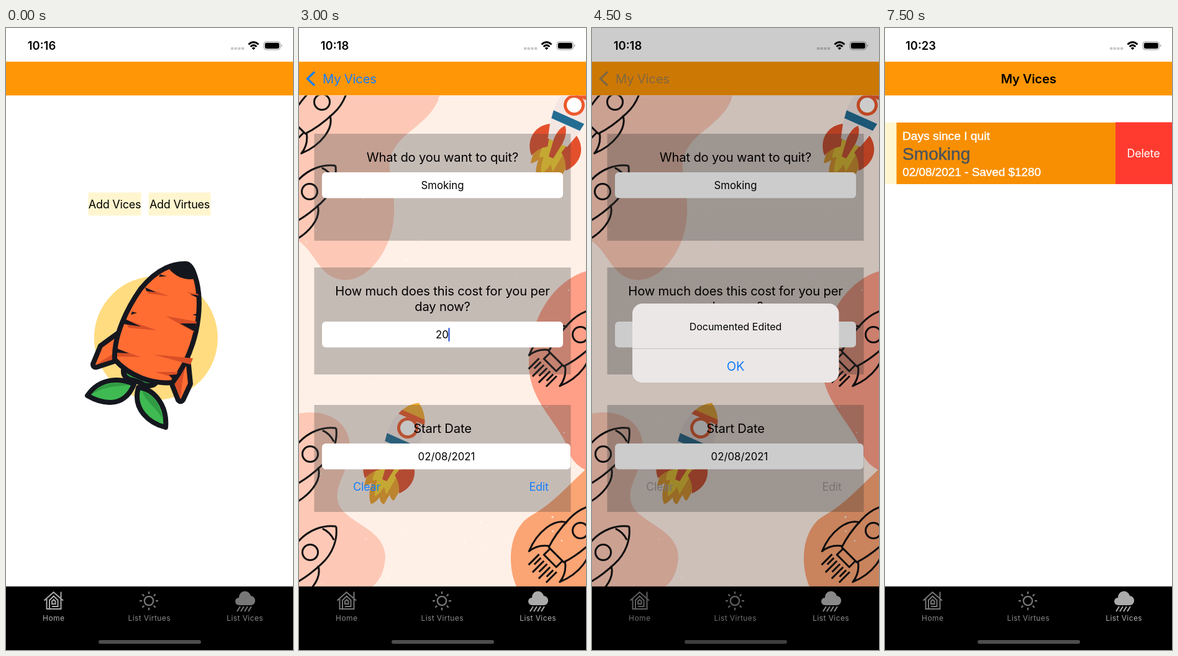
Recreate the animation shown at these times as an HTML page. Size 462 by 1000 pixels, loop 8 s.

```html
<!DOCTYPE html>
<html lang="en">
<head>
<meta charset="utf-8">
<style>
  html, body { margin: 0; height: 100%; overflow: hidden; background: #fff; }
  svg { display: block; width: 100vw; height: 100vh; font-family: Inter, sans-serif; }
  .cell { font-family: "Liberation Sans", Arial, sans-serif; }
</style>
</head>
<body>
<svg id="stage" viewBox="0 0 462 1000"></svg>
<script>
const ORANGE = '#ff9605', CREAM = '#fff6cf', BLUE = '#147efb', INK = '#15171f';

const rect = (x, y, w, h, fill, r = 0) =>
  `<rect x="${x}" y="${y}" width="${w}" height="${h}" rx="${r}" fill="${fill}"/>`;
const path = (d, fill, extra = '') => `<path d="${d}" fill="${fill}" ${extra}/>`;
const line = (d, color, width = 2, extra = '') =>
  path(d, 'none', `stroke="${color}" stroke-width="${width}" ${extra}`);
const circle = (x, y, r, fill, extra = '') =>
  `<circle cx="${x}" cy="${y}" r="${r}" fill="${fill}" ${extra}/>`;
const group = (transform, body, extra = '') => `<g transform="${transform}" ${extra}>${body}</g>`;
const text = (x, y, size, str, fill = '#000', extra = '') =>
  `<text x="${x}" y="${y}" font-size="${size}" fill="${fill}" ${extra}>${str}</text>`;

// Text sizes of the interface: large, medium, small
const MID = 'text-anchor="middle"';
const large = (x, y, s, fill, extra = MID) => text(x, y, 20.2, s, fill, extra + ' letter-spacing="-.17"');
const medium = (x, y, s, fill) => text(x, y, 18, s, fill, MID + ' letter-spacing="-.25"');
const small = (x, y, s) => text(x, y, 16.8, s, '#000', MID);

function statusBar(time) {
  const dots = [362, 367.6, 373.3, 379].map(x => rect(x, 31, 4.3, 4, '#c9c9c9', 1)).join('');
  const wifi = line('M390.5 26.5Q398.5 19 406.5 26.5M393.6 30Q398.5 25.3 403.4 30', '#000', 2.9) +
    path('M395.6 32.2Q398.5 29.6 401.4 32.2L398.5 35.2Z', '#000');
  const battery = `<rect x="415" y="22" width="26.5" height="13" rx="4" fill="none" stroke="#999"/>` +
    rect(416.8, 23.8, 23, 9.4, '#000', 2.4) + path('M443 26.3Q446 28.5 443 30.7Z', '#999');
  return text(57.5, 35, 18.4, time, '#000', MID + ' font-weight="600"') + dots + wifi + battery;
}

function tabBar(active) {
  const icon = [
    c => line('M61.5 920.5L76.5 907L92 920.5M88.5 916V906.5M65.5 918V934H88.5V918M70 934V920L76.7 913.5L83.5 920V930H74', c) +
      line('M74 926V921.5L76.7 919L79.5 921.5V926Z', c),
    c => circle(230, 921, 7.2, 'none', `stroke="${c}" stroke-width="2.3"`) +
      [0, 1, 2, 3, 4, 5, 6, 7].map(i => group(`rotate(${i * 45} 230 921)`, line('M230 906V910', c, 2.3))).join(''),
    c => path('M376 928C367 928 367 916 375 916C375 903 391 902 394 913C404 914 403 928 394 928Z', c) +
      line('M377 930l-5 8M383 930l-5 8M389 930l-5 8M395 930l-5 8', c, 2)
  ];
  const tabs = [[76.7, 'Home'], [230.7, 'List Virtues'], [384.7, 'List Vices']].map(([x, label], i) => {
    const on = i === active;
    return icon[i](on ? '#ababab' : '#777') +
      text(x, 953, 12, label, on ? '#b0b0b0' : '#8a8a8a', MID + ' letter-spacing=".4"');
  });
  return rect(0, 897.8, 462, 102.2, '#000') + tabs.join('') + rect(149, 984, 165, 6, '#4d4d4d', 3);
}

const header = (title = '') =>
  rect(0, 54.2, 462, 54.2, ORANGE) + large(231, 89, title, '#000', MID + ' font-weight="600"');

function carrot() {
  const outline = `stroke="${INK}" stroke-width="8" stroke-linejoin="round"`;
  const shade = '#d94f27';
  return circle(241.3, 498.5, 99.5, '#ffdc80') +
    path('M189 549Q188 561 199 565Q213 568 222 574Q238 578 243 568Z', '#319c43', outline) +
    path('M206 573C187 563 152 560 131 591C152 603 189 614 206 573Z', '#3fba52', outline) +
    path('M138 589C160 575 182 576 197 574C185 569 156 567 138 589Z', '#319c43') +
    path('M213 578C238 580 260 606 257 642C232 636 203 614 213 578Z', '#3fba52', outline) +
    path('M219 584C227 604 245 612 252 630C250 608 237 587 219 584Z', '#319c43') +
    path('M185 487L152 511L140 540Q140 547 147 545L180 534Z', '#ff6d32', outline) +
    path('M178 497L171 525L146 540L176 532Z', shade) +
    path('M293 532L297 572L285 598Q281 603 277 598L266 570Z', '#ff6d32', outline) +
    path('M289 541L284 568L281 595L271 571Z', shade) +
    path('M290 379C299 380 303 394 307 408C318 456 305 522 268 570C235 573 198 559 175 533C173 495 195 450 217 419C240 391 265 378 290 379Z', '#ff6d32', outline) +
    path('M224 418L263 431L229 427ZM191 468L243 486L197 482ZM257 463L307 472L303 489ZM180 516L217 529L179 528ZM237 525L301 531L297 541ZM240 553L277 553L271 562ZM290 424L310 428L310 434Z', shade) +
    path('M224 417L242 425L226 423ZM190 467L217 480L190 476ZM280 475L306 475L304 488ZM178 515L198 523L177 522ZM262 558L275 557L270 566ZM296 428L311 430L311 435ZM248 396L259 399L246 400ZM203 456L211 458L201 461ZM300 461L309 459L308 463Z', INK) +
    path('M263 388C276 402 290 406 306 403L299 382Q294 374 283 377Z', INK);
}

function home() {
  return rect(132.5, 264.5, 85, 37, CREAM) + rect(229.5, 264.5, 100, 37, CREAM) +
    medium(175, 290, 'Add Vices') + medium(279.5, 290, 'Add Virtues') + carrot();
}

function list(days, detail, shift = 0) {
  const bold = 'stroke-width=".45" stroke=';
  const row = rect(0, 152, 110, 99, CREAM) + rect(109.5, 152, 352.5, 99, '#f88f02') +
    text(54.5, 216, 37.2, days, ORANGE, MID + ' font-weight="700"') +
    text(119, 180, 19.2, 'Days since I quit', '#fff', bold + '"#fff"') +
    text(119, 212, 28.1, 'Smoking', '#4b545c', bold + '"#4b545c"') +
    text(119.3, 238, 18.9, detail, '#fff', bold + '"#fff"');
  return group(`translate(${-shift})`, row, 'class="cell"') +
    (shift ? rect(371, 151.5, 91, 99.5, '#ff3b30') + medium(416, 208, 'Delete', '#fff') : '');
}

const mirrored = body => body + group('scale(-1 1)', body);

// Outlined rocket, its window at the origin
function lineRocket(x, y) {
  const half = 'M0 -59C17 -46 27 -24 26 0Q25 32 17 55H0M24 6C44 16 48 50 35 82Q33 64 18 53' +
    'M14 56V69H0M7 76V102M14 76V91M20 74V98';
  return group(`translate(${x} ${y}) rotate(45)`,
    mirrored(line(half, '#111', 3, 'stroke-linejoin="round"')) +
    line('M-13 -41Q0 -46 13 -41M0 76V94', '#111', 3) +
    circle(0, 0, 12.5, 'none', 'stroke="#111" stroke-width="3"'));
}

// Coloured rocket, its window at the origin
function colorRocket(x, y) {
  return group(`translate(${x} ${y}) rotate(24)`,
    path('M-23 62Q-32 92 -26 114Q-20 110 -17 104Q-15 126 -4 136Q2 130 4 120Q8 128 15 128Q16 118 17 110Q22 116 27 116Q32 90 23 62Z', '#f2a126') +
    path('M-18 66Q-21 90 -17 100L-11 96Q-9 116 -3 122Q2 114 4 102L12 112Q15 90 17 66Z', '#ffd52e') +
    mirrored(path('M21 42C45 54 49 82 30 102Q25 86 12 78Z', '#e4502c')) +
    path('M0 -44C24 -30 32 4 25 38L17 66H-17L-25 38C-32 4 -24 -30 0 -44Z', '#f4e6e2') +
    path('M0 -44Q14 -36 20 -22H-20Q-14 -36 0 -44Z', '#f3ac2f') +
    path('M-20 -23H20L23 -15H-23Z', '#ec5a2d') +
    path('M-27 21H27L25 34H-25Z', '#236d93') +
    path('M0 36Q8 44 8 62L4 92H-4L-8 62Q-8 44 0 36Z', '#e4502c') +
    circle(0, 0, 14.5, '#fff', 'stroke="#ec5a2d" stroke-width="5"'));
}

function wallpaper() {
  let seed = 7, specks = '';
  const random = () => (seed = seed * 16807 % 2147483647) / 2147483647;
  for (let i = 0; i < 70; i++)
    specks += circle(random() * 462, 110 + random() * 785, .5 + random() * 1.1, '#fff', 'opacity=".7"');
  return `<clipPath id="page">${rect(0, 108.4, 462, 790, '#000')}</clipPath><g clip-path="url(#page)">` +
    rect(0, 108, 462, 790, '#fff0e7') +
    path('M0 108H227C212 156 164 164 149 203C138 230 158 260 152 310C147 358 112 405 75 405C34 405 28 362 0 343Z', '#fdc9b6') +
    path('M462 391C412 406 370 464 370 540C370 605 425 638 437 688Q445 703 462 711Z', '#ff9f87') +
    path('M0 620C38 612 80 628 82 672C82 715 50 740 66 770C84 798 140 808 139 852Q136 885 118 898H0Z', '#fdc9b6') +
    path('M462 709C432 736 412 762 372 785C338 806 334 862 350 898H462Z', '#fba474') + specks +
    [[37, 119], [17, 263], [18, 685], [18, 843], [453, 493], [453, 808]].map(p => lineRocket(...p)).join('') +
    colorRocket(443, 124) + colorRocket(175, 643) + '</g>';
}

function form(dialog) {
  const tint = dialog ? '#94908e' : BLUE, back = dialog ? '#a08052' : BLUE;
  const panels = [170, 385, 606].map(y => rect(24.5, y, 413, 172, 'rgba(64,64,64,.3)')).join('');
  return line('M25 70.5L13.5 81.5L25 92.5', back, 3.2) +
    large(38, 89, 'My Vices', back, '') + wallpaper() + panels +
    large(231, 215, 'What do you want to quit?') + rect(37, 232, 388, 41.5, '#fff', 6) + small(231, 259, 'Smoking') +
    large(231, 430, 'How much does this cost for you per') + large(231, 455, 'day now?') +
    rect(37, 472, 388, 41.5, '#fff', 6) + small(230.5, 499, '20') +
    (dialog ? '' : rect(240.3, 482, 2.4, 22, '#3d62d9', 1)) +
    large(231, 651, 'Start Date') + rect(37, 668, 400, 41.5, '#fff', 6) + small(237.5, 695, '02/08/2021') +
    medium(109, 744, 'Clear', tint) + medium(386, 744, 'Edit', tint);
}

const alertBox = () => rect(0, 0, 462, 1000, 'rgba(0,0,0,.2)') +
  rect(65, 443, 332.5, 127, '#ebe7e7', 16) + rect(65, 515, 332.5, 1, '#c4c0bf') +
  text(231, 486, 16, 'Documented Edited', '#000', MID) + large(231, 551, 'OK', BLUE);

const screen = (time, title, body, tab, over = '') =>
  rect(0, 0, 462, 1000, '#fff') + statusBar(time) + header(title) + body + tabBar(tab) + over;

const scenes = [
  screen('10:16', '', home(), 0),
  screen('10:17', 'My Vices', list(33, '02/09/2021 - Saved $1650'), 2),
  screen('10:18', '', form(false), 2),
  screen('10:18', '', form(true), 2, alertBox()),
  screen('10:18', 'My Vices', list(64, '02/08/2021 - Saved $1280'), 2),
  screen('10:23', 'My Vices', list(64, '02/08/2021 - Saved $1280', 91), 2)
];

const stage = document.getElementById('stage');
let shown = -1;
function draw() {
  const index = Math.floor(performance.now() % 8000 / 1500);
  if (index !== shown) stage.innerHTML = scenes[shown = index];
  requestAnimationFrame(draw);
}
draw();
</script>
</body>
</html>
```
